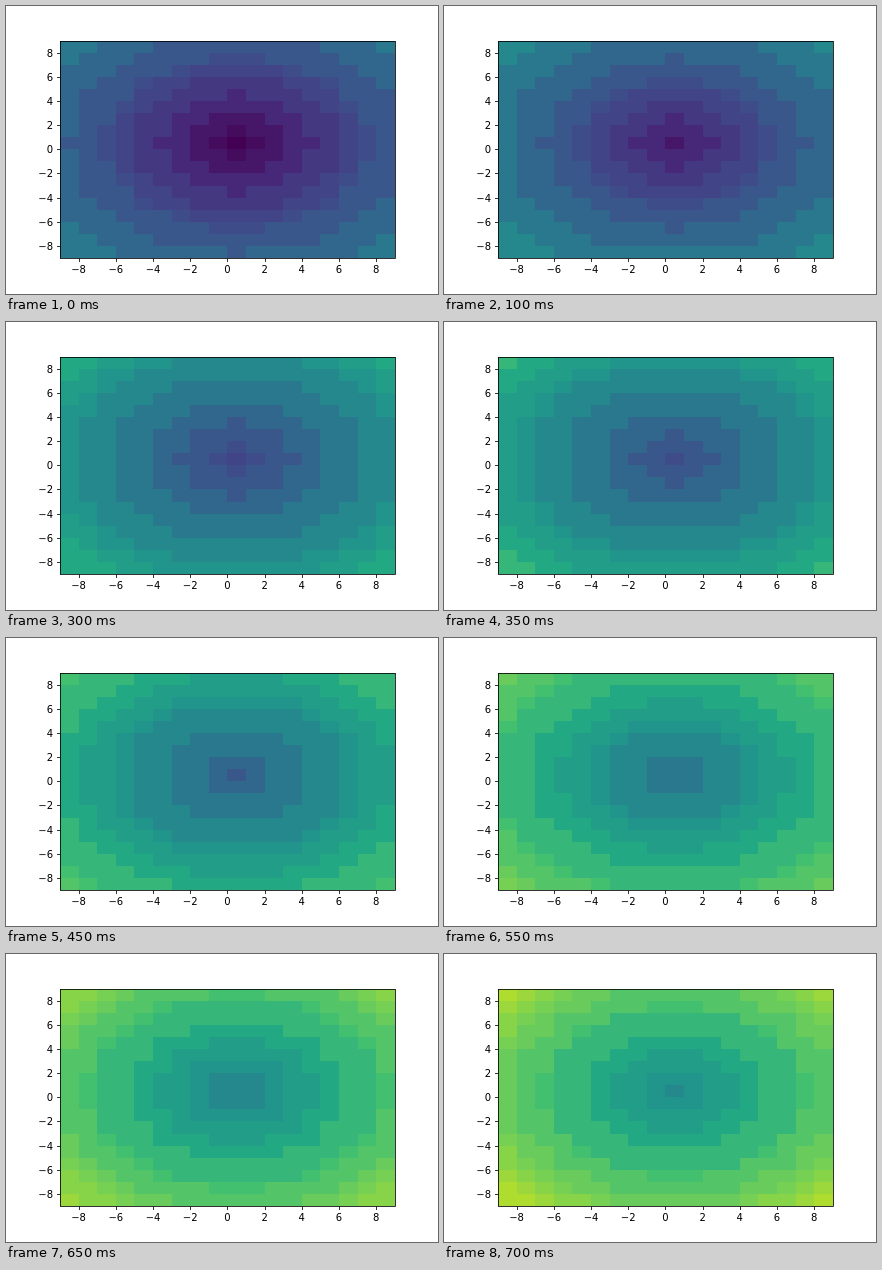
An HTML page that plays this animation: 432 px wide and 288 px high, repeating every 750 ms.

```html
<!DOCTYPE html>
<html>
<head>
<meta charset="utf-8">
<style>
  html, body { margin: 0; width: 100%; height: 100%; overflow: hidden; background: #fff; }
  svg { display: block; }
  text { font: 10px "DejaVu Sans", sans-serif; }
</style>
</head>
<body>
<svg width="432" height="288">
  <g id="cells" shape-rendering="crispEdges"></g>
  <g id="axes" fill="none" stroke="#000" stroke-width=".8">
    <rect x="54.5" y="35.5" width="335" height="217"/>
  </g>
  <g id="labels"></g>
</svg>
<script>
const STEP = 50, STEPS = 15, Z_MAX = 30;
const VIRIDIS = ['440154', '482475', '414487', '355f8d', '2a788e', '21918c',
                 '22a884', '44bf70', '7ad151', 'bddf26', 'fde725']
  .map(hex => [0, 2, 4].map(i => parseInt(hex.substr(i, 2), 16)));
// The colour scale is shown in flat bands with these edges.
const EDGES = [0, .5, 1.2, 2.5, 4.06, 5.6, 6.5, 7.2, 9.03, 11, 12.9, 14.9, 15.9, 17.3,
               18.8, 20.8, 21.1, 22.6, 23.5, 24.1, 25.1, 25.9, 26.8];

function viridis(z) {
  const p = z / Z_MAX * 10, i = Math.floor(p), f = p - i;
  return `rgb(${VIRIDIS[i].map((c, k) => Math.round(c + (VIRIDIS[i + 1][k] - c) * f))})`;
}
const bandColors = EDGES.slice(1).map((edge, i) => viridis(i ? (edge + EDGES[i]) / 2 : 0));
const color = z => bandColors[EDGES.findIndex(edge => edge > z) - 1];

const px = x => 54 + (x + 9) * 18.6;
const py = y => 252 - (y + 9) * 12.08;

function add(parent, tag, attrs, text = '') {
  const el = document.createElementNS('http://www.w3.org/2000/svg', tag);
  for (const name in attrs) el.setAttribute(name, attrs[name]);
  el.textContent = text;
  return document.getElementById(parent).appendChild(el);
}

const cells = [];
for (let y = -9; y < 9; y++) {
  for (let x = -9; x < 9; x++) {
    const [left, right, top, bottom] = [px(x), px(x + 1), py(y + 1), py(y)].map(Math.round);
    const el = add('cells', 'rect', { x: left, y: top, width: right - left, height: bottom - top });
    cells.push({ el, r: Math.hypot(x, y) });
  }
}

for (let v = -8; v <= 8; v += 2) {
  const label = String(v).replace('-', '\u2212');
  const x = px(v), y = py(v);
  add('axes', 'path', { d: `M${Math.round(x) + .5} 252.5v3.5M54.5 ${Math.round(y) + .5}h-3.5` });
  add('labels', 'text', { x, y: 267, 'text-anchor': 'middle' }, label);
  add('labels', 'text', { x: 47, y: Math.round(y + 4), 'text-anchor': 'end' }, label);
}

let shown = -1;
function draw() {
  const t = Math.floor(performance.now() / STEP) % STEPS;
  if (t !== shown) {
    for (const { el, r } of cells) el.setAttribute('fill', color(r + t));
    shown = t;
  }
  requestAnimationFrame(draw);
}
draw();
</script>
</body>
</html>
```
